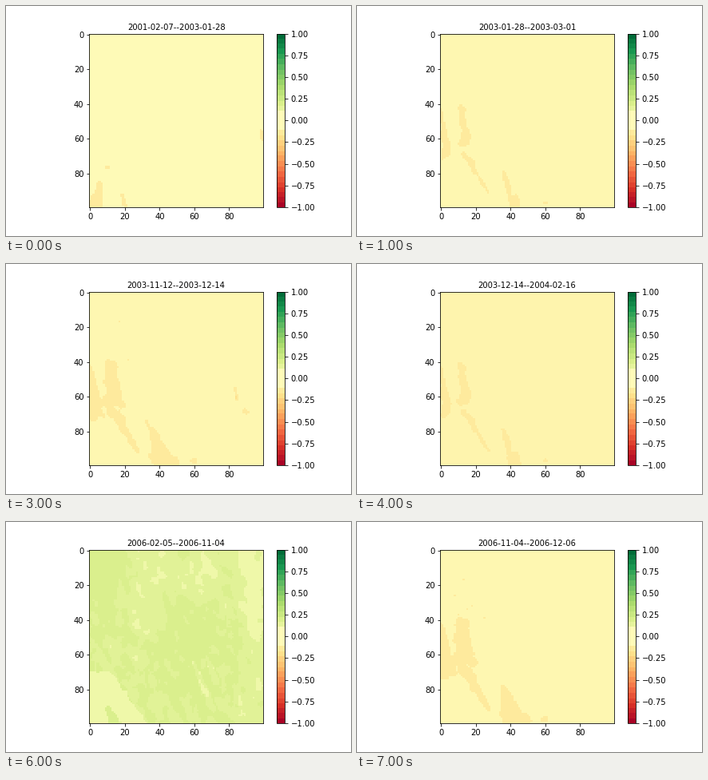
Recreate the animation shown at these times as a matplotlib script. Size 432x288 px, loop 8000 ms.

```python
import matplotlib.pyplot as plt
import numpy as np
from matplotlib.animation import FuncAnimation
from matplotlib.cm import ScalarMappable
from matplotlib.colors import ListedColormap, Normalize

N = 100
Y, X = np.mgrid[0:N, 0:N] + 0.5
DATES = ["2001-02-07", "2003-01-28", "2003-03-01", "2003-11-12", "2003-12-14",
         "2004-02-16", "2006-02-05", "2006-11-04", "2006-12-06"]
DRY, PALE, MID, LUSH = -0.13, 0.085, 0.15, 0.195


def noise(seed, sx, sy, shear=0.0):
    """Smooth unit-variance noise; shear leans it to the lower right."""
    white = np.random.default_rng(seed).normal(size=(N, N))
    fy, fx = np.fft.fftfreq(N)[:, None], np.fft.fftfreq(N)[None, :]
    blur = np.exp(-2 * np.pi ** 2 * ((sx * fx) ** 2 + (sy * fy) ** 2))
    z = np.fft.ifft2(np.fft.fft2(white) * blur).real
    z = np.array([np.roll(row, int(shear * i)) for i, row in enumerate(z)])
    return (z - z.mean()) / z.std()


def oval(x, y, rx, ry):
    return np.exp(-(((X - x) / rx) ** 2 + ((Y - y) / ry) ** 2) ** 2)


def stroke(x0, y0, x1, y1, w0, w1):
    """Distance to a segment, relative to its tapering half-width."""
    dx, dy = x1 - x0, y1 - y0
    t = np.clip(((X - x0) * dx + (Y - y0) * dy) / (dx * dx + dy * dy), 0, 1)
    return np.hypot(X - x0 - t * dx, Y - y0 - t * dy) / (w0 + t * (w1 - w0))


def mask(*strokes, size=1.0, rough=0.15):
    nearest = np.minimum.reduce([stroke(*s) for s in strokes])
    return nearest + rough * EDGE < size


def specks(count, seed):
    """Single dry cells scattered north of the valleys."""
    rng = np.random.default_rng(seed)
    cells = np.zeros((N, N), bool)
    cells[rng.integers(17, 50, count), rng.integers(8, 26, count)] = True
    return cells


EDGE = noise(3, 1.2, 1.4)
GRAIN = 0.36 * noise(11, 1.5, 3, 0.3) + 0.24 * noise(12, 1, 1.5)

# Landmarks that return from season to season.
VALLEYS = [(12.5, 43, 14, 62, 3.5, 6), (0, 44, 4, 69, 1.5, 5),
           (14, 69, 28, 92, 3.5, 1), (36, 79, 44, 101, 1.5, 7.5),
           (60, 97.5, 61, 97.5, 1.5, 1.5)]
FURROWS = mask((60, 65, 71, 92, 1, 2.2), (67.5, 62, 73, 76, 1, 2))
RIDGES = mask((47, 38, 63, 68, 1.5, 1.2), (63, 72, 78, 98, 1.2, 1.5),
              (16, 77, 34, 99, 1, 1.5))
PLAIN = (Y > 70 + 0.5 * EDGE) & (X < 13 + 0.7 * (Y - 71) + 0.7 * EDGE)
MOUND = mask((11, 92, 15, 101, 1.5, 4))
CLEARING = oval(64, 17, 11, 12)
EAST = oval(97, 18, 8, 30)


def autumn(base, size, loose):
    dry = mask(*VALLEYS, size=size) | specks(loose, 5)
    return np.where(dry, DRY, base)


def growth(bias):
    z = GRAIN + bias - 1.1 * CLEARING - 1.1 * EAST - 1.6 * FURROWS
    z = np.select([z < -0.75, z > 0.6], [PALE, LUSH], MID)
    z[PLAIN & ~MOUND] = PALE
    return z


def calm(*strokes):
    return np.where(mask(*strokes), DRY, -0.03)


first_calm = calm((6, 86, 4, 100, 1.5, 4.5), (19, 93, 21, 100, 0.8, 1),
                  (98.5, 56, 100, 61, 0.8, 1.8), (10, 77, 11, 77, 1, 1))
second_calm = calm((94.5, 40.5, 95.5, 40.5, 0.7, 0.7))

first_green = growth(0.3 - 0.006 * X + 0.8 * RIDGES)
second_green = growth(0.55 + 0.9 * oval(8, 8, 17, 16) + 0.6 * oval(62, 62, 22, 34)
                      - 0.7 * oval(34, 28, 11, 40) - 0.5 * oval(60, 4, 32, 24)
                      - 0.6 * (X > 86))

first_autumn = autumn(-0.05, 1.0, 3)
first_autumn[mask((84, 56, 85, 62, 0.8, 1.3), (89, 68.5, 90.5, 69.5, 1.2, 1.2),
                  (33, 75, 36, 81, 1, 1))] = DRY
first_autumn[mask((84.5, 61, 85, 62, 0.7, 0.7))] = -0.2
second_autumn = autumn(-0.05, 1.1, 8)

fields = [first_calm, autumn(-0.05, 0.5, 0), first_green, first_autumn,
          autumn(-0.07, 0.6, 0), second_calm, second_green, second_autumn]


def banded_cmap():
    v = np.linspace(-1, 1, 256)
    a = np.abs(v)
    step = np.minimum(0.14 + 0.06 * np.floor((a - 0.11) / 0.06), 1)
    v = np.where(a < 0.11, -0.03, np.sign(v) * step)
    return ListedColormap(plt.get_cmap("RdYlGn")((v + 1) / 2))


plt.rcParams.update({"font.family": "DejaVu Sans", "font.size": 10})
fig, ax = plt.subplots(figsize=(6, 4), dpi=72)
fig.subplots_adjust(left=0.125, right=0.9, bottom=0.125, top=0.88)
image = ax.imshow(fields[0], cmap="RdYlGn", vmin=-1, vmax=1,
                  interpolation="nearest")
title = ax.set_title("", fontsize=10, pad=5)
ax.set_xticks(range(0, N, 20))
ax.set_yticks(range(0, N, 20))
bar = fig.colorbar(ScalarMappable(Normalize(-1, 1), banded_cmap()), ax=ax)
bar.set_ticks(np.linspace(-1, 1, 9))


def update(i):
    image.set_data(fields[i])
    title.set_text(f"{DATES[i]}--{DATES[i + 1]}")
    return image, title


anim = FuncAnimation(fig, update, frames=len(fields), interval=1000,
                     repeat=True, repeat_delay=0, blit=False)
plt.show()
```
